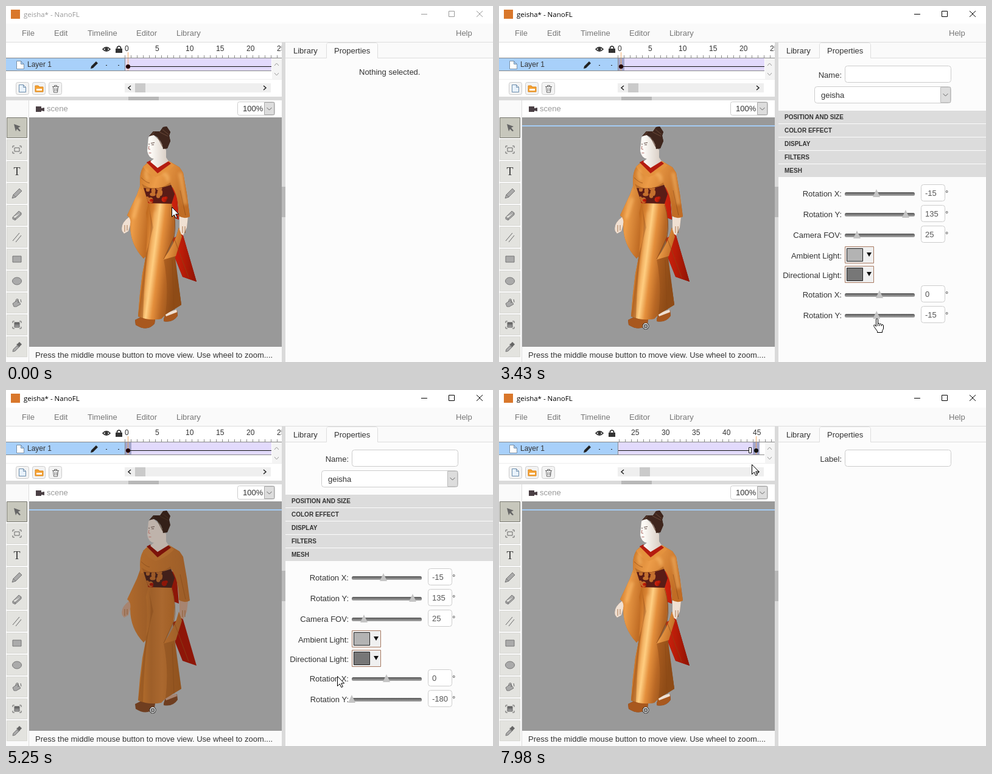
An HTML page that plays this animation: 800x585 px, repeating every 8 s.

```html
<!DOCTYPE html>
<html lang="en">
<head>
<meta charset="utf-8">
<title>Mesh lighting</title>
<style>
html, body { margin: 0; width: 100%; height: 100%; overflow: hidden; background: #fff; }
svg { display: block; width: 800px; height: 585px; font: 13px "Liberation Sans", Arial, sans-serif; fill: #333; }
.menu { fill: #777; }
.label { text-anchor: end; }
.box { fill: #fff; stroke: #ccc; }
.head { font-size: 10px; font-weight: bold; }
.small { font-size: 12px; }
.line { fill: none; stroke: #666; }
.icon { fill: #aaa; stroke: #777; }
</style>
</head>
<body>
<svg viewBox="0 0 800 585">
  <defs>
    <linearGradient id="track" x2="0" y2="1"><stop stop-color="#555"/><stop offset="1" stop-color="#aaa"/></linearGradient>
    <linearGradient id="skirtLit" gradientUnits="userSpaceOnUse" x1="222" y1="416" x2="283" y2="424">
      <stop stop-color="#c26c20"/><stop offset=".15" stop-color="#d98434"/><stop offset=".32" stop-color="#ffd084"/>
      <stop offset=".48" stop-color="#e48f3c"/><stop offset=".7" stop-color="#b96825"/><stop offset="1" stop-color="#8f4e18"/>
    </linearGradient>
    <linearGradient id="skirtDim"><stop stop-color="#b8702c"/><stop offset=".3" stop-color="#9e5f29"/><stop offset=".55" stop-color="#aa682f"/><stop offset="1" stop-color="#9c5a20"/></linearGradient>
    <linearGradient id="clothLit" x2="1" y2=".4"><stop stop-color="#c87426"/><stop offset=".4" stop-color="#ec9c48"/><stop offset="1" stop-color="#c06c24"/></linearGradient>
    <linearGradient id="clothDim"><stop stop-color="#b06a2c"/><stop offset="1" stop-color="#9c5d28"/></linearGradient>
    <linearGradient id="ribbonLit"><stop stop-color="#d42410"/><stop offset=".5" stop-color="#b81c08"/><stop offset="1" stop-color="#8e1404"/></linearGradient>
    <linearGradient id="faceLit"><stop offset=".2" stop-color="#fbf9f5"/><stop offset="1" stop-color="#d6cac0"/></linearGradient>
    <linearGradient id="falloff" gradientUnits="userSpaceOnUse" x1="190" x2="315"><stop stop-color="#fff"/><stop offset="1" stop-color="#000"/></linearGradient>
    <mask id="light" maskUnits="userSpaceOnUse" x="180" y="190" width="140" height="350"><path fill="url(#falloff)" d="M180 190h140v350H180z"/></mask>
    <filter id="soft" x="-50%" y="-50%" width="200%" height="200%"><feGaussianBlur stdDeviation="2.500"/></filter>
    <clipPath id="obi"><path d="M226 299q24 3 45-5l6 15-5 16-38-1z"/></clipPath>
    <clipPath id="rulerClip"><path d="M195 60h258v26H195z"/></clipPath>
    <clipPath id="trackClip"><path d="M196 60h240v47H196z"/></clipPath>
  </defs>

  <!-- title and menu -->
  <path fill="#fff" d="M0 0h800v585H0z"/>
  <rect x="8" y="6" width="15" height="15" fill="#d9772b"/>
  <g id="title">
    <text x="29" y="18" style="font:11.5px 'Open Sans','Noto Sans',sans-serif" fill="currentColor">geisha* - NanoFL</text>
    <path d="M682 13.500h10M727.500 8.500h9v9h-9zM773 8l10 10m0-10l-10 10" fill="none" stroke="currentColor"/>
  </g>
  <path fill="#fafafa" d="M0 29h800v31H0zM459 60h341v525H459zM0 155h38v430H0zM38 560h415v25H38z"/>
  <path stroke="#ddd" d="M0 59.500h800"/>
  <g class="menu">
    <text x="26" y="49">File</text><text x="79" y="49">Edit</text><text x="134" y="49">Timeline</text>
    <text x="214" y="49">Editor</text><text x="280" y="49">Library</text><text x="739" y="49">Help</text>
  </g>

  <!-- timeline -->
  <path fill="#a8d0fa" d="M0 86h195v20H0z"/>
  <path d="M159 71q6-6.500 12 0q-6 6.500-12 0z" fill="#fff" stroke="#222" stroke-width="1.500"/><circle cx="165" cy="71" r="2.700"/>
  <path d="M180 70h11v7h-11z"/><path d="M182.500 70v-2q3-4 6 0v2" fill="none" stroke="#222" stroke-width="1.600"/>
  <path d="M17.500 90.500h7l5 5v8h-12zm7 0v5h5" fill="#fff" stroke="#7890a8"/>
  <text class="small" x="35" y="100">Layer 1</text>
  <path d="M139 103l1-4 8-8 3 3-8 8zM164 97h2v1h-2zM184 97h2v1h-2z" fill="#222"/>
  <g clip-path="url(#rulerClip)"><g class="scrolled" id="ruler"></g></g>
  <g clip-path="url(#trackClip)"><g class="scrolled">
    <path fill="#e2dafc" d="M196 86h460v20H196z"/>
    <path id="cell" fill="#a3a6cc" d="M195 86h11v20h-11z"/>
    <path d="M200 99.500h440" stroke="#111"/>
    <path d="M638.500 94.500h4v9h-4z" fill="#fff" stroke="#111"/>
    <path id="playhead" d="M200.500 76v30" stroke="#f0a868"/>
    <circle cx="200.500" cy="99.500" r="3.600" fill="#200"/><circle cx="650.500" cy="99.500" r="3.600" fill="#111"/>
  </g></g>
  <path d="M0 85.500h453M0 106.500h436M195.500 86v20" stroke="#888"/>
  <path fill="#f4f4f4" d="M437 86h16v34h-16z"/>
  <path d="M441 98l3.500-4 3.500 4m-7 12l3.500 4 3.500-4" fill="none" stroke="#999"/>
  <path d="M0 120.500h453" stroke="#eee"/>
  <g id="layerButtons"></g>
  <path d="M21.500 129.500h7l4 4v8h-11zm7 0v4h4" fill="#e8f2fc" stroke="#6a8cac"/>
  <path d="M48 131h5l2 2h6v8H48z" fill="#f5a234" stroke="#d98418"/><path d="M50 136h9v3h-9z" fill="#fff"/>
  <path class="line" d="M76 132.500h11m-7.500 0v-2h4v2m-6 .5l1 9h6l1-9m-5 2v5m3-5v5"/>
  <path fill="#efefef" d="M195 127h240v15H195z"/>
  <rect id="thumb" y="127" width="17" height="15" fill="#cacaca"/>
  <path d="M205 131l-4 3.500 4 3.500m218-7l4 3.500-4 3.500" fill="none" stroke="#222" stroke-width="1.500"/>
  <path fill="#dadada" d="M0 149h453v6H0zM453 60h6v525h-6z"/>
  <path fill="#b8b8b8" d="M201 149h50v6h-50zM453 297h6v50h-6z"/>

  <!-- scene -->
  <path d="M49 165h9v3l5-1v6l-5-1v2h-9z" fill="#4b4045"/>
  <text x="67" y="173" style="fill:#999">scene</text>
  <rect class="box" x="380.500" y="157.500" width="61" height="22" rx="3"/>
  <text x="389" y="173">100%</text>
  <path d="M424.500 158.500h16v20h-16z" fill="#ddd" stroke="#aaa"/><path class="line" d="M428.500 167l4 4 4-4"/>
  <path fill="#999" d="M38 183h415v377H38z"/><path d="M37.500 155v430" stroke="#ddd"/>
  <path class="selected" d="M38 197h415" stroke="#a4cbf4" stroke-width="2"/>
  <g id="dim"></g><g id="lit" mask="url(#light)"></g>
  <g class="selected" fill="none"><circle cx="241" cy="526" r="4" fill="#999" stroke="#222" stroke-width="3"/><circle cx="241" cy="526" r="4" stroke="#fff" stroke-width="1.300"/></g>
  <text x="48" y="578">Press the middle mouse button to move view. Use wheel to zoom....</text>
  <g id="tools"></g>

  <!-- properties -->
  <path d="M459 85.500h67.500V64q0-3.500 3.500-3.500h77q3.500 0 3.500 3.500v21.500H800" fill="none" stroke="#ddd"/>
  <path d="M527 86V64q0-3 3-3h77q3 0 3 3v22h190v499H459V86z" fill="#fcfcfc"/>
  <text x="472" y="78">Library</text><text x="539" y="78">Properties</text>
  <text id="empty" x="580" y="113">Nothing selected.</text>
  <g class="selected"><rect class="box" x="568.500" y="98.500" width="174" height="27" rx="4"/><text id="fieldName" class="label" x="563" y="118"></text></g>
  <g id="mesh">
    <rect class="box" x="518.500" y="132.500" width="224" height="27" rx="4"/><text x="529" y="151">geisha</text>
    <path d="M725.500 133.500h16v25h-16z" fill="#ddd" stroke="#bbb"/><path class="line" d="M729.500 144l4 4 4-4"/>
  </g>
  <path id="arrow" d="M.5.5v16l3.700-3.500 2.600 5.600 2.500-1.100-2.600-5.500h5z" fill="#fff" stroke="#000"/>
  <path id="hand" d="M-1.500 1.500q2-2 3 .5v7q2-1.500 3 .5 2-1 3 1 2.500-.5 3 1.500v5q-1 2.500-2 4v2.500h-8v-2l-5-7q-2-4 1-3.500l2 2.500zM1.500 9v4m3-3v3m3-2v2" fill="#fff" stroke="#000"/>
</svg>
<script>
const LOOP = 8000, STEP = 70;
const $ = id => document.getElementById(id);
const all = (selector, run) => document.querySelectorAll(selector).forEach(run);
const add = (id, markup) => $(id).insertAdjacentHTML('beforeend', markup);
const show = (el, on) => el.style.display = on ? '' : 'none';
const move = (el, x, y = 0) => el.setAttribute('transform', `translate(${x} ${y})`);
const each = (n, make) => Array.from({ length: n }, (_, i) => make(i)).join('');
const noise = n => { const v = Math.sin(n * 127.1) * 43758.5; return v - Math.floor(v); };

add('ruler', each(50, i => `<path d="M${195.5 + i * 10} 81v4" stroke="#888"/>` +
  (i % 5 ? '' : `<text class="small" x="${195 + i * 10}" y="74">${i}</text>`)));
add('layerButtons', each(3, i => `<rect x="${16.5 + i * 27}" y="125.500" width="21" height="20" rx="3" fill="#f3f3f3" stroke="#ccc"/>`));

// The same figure is drawn once in shade and once in full light.
const figure = c => `
  <path fill="${c.ribbon}" d="M268 296l12 5 4 50-13-5zm6 86l16-8 23 79-23-8-12-30z"/>
  <path fill="${c.shoe}" d="M259 515l3-10 19-5 1 9q-8 12-23 9zM212 516l10-5 23 4-1 7q-12 14-31 2z"/>
  <path fill="${c.skin}" d="M261 505l19-6 1 4-18 7zM203 346q-16 12-12 24l3 4 7-4 5-18zM285 346h14l-2 18-6 13-6-4z"/>
  <path fill="${c.cloth}" d="M223 288l-8 22-16 34q7 5 5 16 0 32 22 55l7-8 3-81-8-28z"/>
  <path fill="${c.skirt}" d="M234 324h38q8 25 3 56l-15 36 17-5 4 30 7 50-26 16-7 7q-20 4-38-4 2-35 7-70l5-25q5-45 1-75z"/>
  <path fill="${c.fold}" opacity=".45" d="M276 378l-17 38q9 45 3 91l26-16-10-78zM234 326q9 45-4 80l-13 104 8 4q3-110 17-150z"/>
  <path fill="${c.cloth}" d="M284 364q-6 26-26 53l21-6 10-32z"/>
  <path fill="${c.cloth}" d="M236 256q-20 8-15 45h28l22-7q13 18 13 51 9 6 18 1-4-36-11-72l-6-9-17-10z"/>
  <g clip-path="url(#obi)">
    <path fill="${c.obi}" d="M220 290h60v40h-60z"/>
    ${each(14, i => `<ellipse cx="${228 + 36 * noise(i + 1) ** 1.4}" cy="${300 + 24 * noise(i + 30)}" rx="${2 + noise(i) * 3}" ry="${2 + noise(i + 60) * 4}" fill="${i % 3 ? c.pattern : c.ribbon}"/>`)}
  </g>
  <path fill="${c.fold}" d="M223 292q22 16 47-2l1 4q-22 9-45 5z" opacity=".4"/>
  <path fill="${c.lapel}" d="M225 264q8 13 21 17 18-6 30-19l-8-7-20 13-12-12z"/>
  <path fill="${c.collar}" d="M231 257l6-3 12 12 16-12 6 5-22 16z"/>
  <path fill="${c.face}" d="M234 216l6-6 13 12 10 15v12l4 6-18 11-12-10 6-5q-9-1-11-13z"/>
  <path fill="${c.hair}" d="M235 214l7-8h11l5-7 6-1 6 9-2 6 2 9-5 12-7 1q-2-17-15-23z"/>
  <path fill="none" stroke="${c.hairShine}" d="M244 207l-5 5m13-5l14 7m-17 1l8 16m0-28l10 8"/>
  <path fill="none" stroke="#5a453e" d="M238 225.500l6-1m-5 3.500h4M234 227h2"/>
  <path fill="none" stroke="#b0706a" d="M235 230l-1 5 3 .5m-2.500 6h4"/>
  <path fill="none" stroke="${c.fold}" opacity=".7" d="M272 327q9 28 4 52l-17 37m14 1l3 82M286 303l9 41M222 282q8 8 14 9M276 381l24 65M195 360v11m4-11v9M290 362v11m4-11v11"/>
  <path fill="none" stroke="${c.glow}" stroke-width="5" filter="url(#soft)" d="M231 269q-3 8 2 17M258 276q10 2 7 12M286 274l9 52M219 316l-10 33M246 338q-6 60-14 140" opacity=".6"/>`;

add('dim', figure({
  ribbon: '#8e1608', shoe: '#6f3e20', skin: '#a78470', cloth: 'url(#clothDim)', skirt: 'url(#skirtDim)', fold: '#844a1c', obi: '#42201a',
  pattern: '#9c5a28', lapel: '#ae6a2e', collar: '#7c130b', face: '#bfb3ab', hair: '#342018', hairShine: '#46301f', glow: 'none'
}));
add('lit', figure({
  ribbon: 'url(#ribbonLit)', shoe: '#a8581e', skin: '#f0e0d2', cloth: 'url(#clothLit)', skirt: 'url(#skirtLit)', fold: '#8c4816', obi: '#5a1c16',
  pattern: '#c4702e', lapel: '#e4923e', collar: '#b41c10', face: 'url(#faceLit)', hair: '#3f261d', hairShine: '#6b4a38', glow: '#ffc474'
}));

const corners = '<path class="line" d="M-7-3v-3h3m8 0h3v3M7 3v3H4m-8 0h-3V3"/>';
const icons = [
  '<path d="M-5-6L6-2 2 0l4 5-2 1-4-4-2 4z" fill="#666"/>',
  corners + '<path class="line" d="M-4-3h8v6h-8z"/>',
  '<text text-anchor="middle" y="6" style="font:18px Liberation Serif,serif">T</text>',
  '<path class="icon" d="M-8 8l2-6L4-8l4 4L-2 6zm2-6l4 4"/>',
  '<path class="icon" d="M-7 3L3-7l4 3v3L-3 8l-4-2zl4 2L7-4M-3 5v3"/>',
  '<path class="line" d="M-7 6L4-7M-2 8L7-3"/>',
  '<path class="icon" d="M-7-5H7V5H-7z"/>',
  '<ellipse class="icon" rx="7.500" ry="6"/>',
  '<path class="icon" d="M-7 1l8-6 5 7-7 4h-4z"/><path class="line" d="M-2-2q0-6 4-4v6m4-6l1 5"/>',
  corners + '<path d="M-4-4h8v8h-8z" fill="url(#track)" stroke="#666"/>',
  '<path class="icon" d="M-7 8l1-4 6-6 3 3-6 6z"/><path d="M-1-4l2-1 3-3 4 4-3 3-1 2z" fill="#666"/>'
];
add('tools', icons.map((icon, i) => {
  const skin = i ? 'fill="#e3e3df" stroke="#d8d8d4"' : 'fill="#c7c7bc" stroke="#77776f"';
  return `<g transform="translate(18 ${200 + i * 36})"><path d="M-16.500-16.500h33v33h-33z" ${skin}/>${icon}</g>`;
}).join(''));

const slider = (label, y, x, value, id) => `
  <text class="label" x="563" y="${y + 5}">${label}:</text>
  <rect x="568" y="${y - 2}" width="115" height="6" rx="2.500" fill="url(#track)"/>
  <path id="${id}Knob" transform="translate(${x})" d="M0 ${y - 7}l6 13h-12z" fill="#c4c4c4"/>
  <rect class="box" x="693.500" y="${y - 14.5}" width="39" height="27" rx="4"/>
  <text id="${id}Value" x="700" y="${y + 4}" style="fill:#555">${value}</text><text x="733" y="${y + 4}">°</text>`;
const swatch = (label, y, color) => `
  <text class="label" x="563" y="${y + 20}">${label}:</text>
  <path d="M568.500 ${y + .5}h47v27h-47z" fill="#f0f0f0" stroke="#a87a62"/>
  <path d="M571.500 ${y + 3.5}h26v21h-26z" fill="${color}" stroke="#222"/>
  <path d="M604 ${y + 10}h8l-4 7z" fill="#111"/>`;
add('mesh', ['POSITION AND SIZE', 'COLOR EFFECT', 'DISPLAY', 'FILTERS', 'MESH'].map((name, i) =>
  `<path d="M459 ${172 + i * 22}h341v21H459z" fill="#dcdcdc"/><text class="head" x="469" y="${186 + i * 22}">${name}</text>`).join('') +
  slider('Rotation X', 308, 620, -15, 'tilt') + slider('Rotation Y', 342, 668, 135, 'turn') +
  slider('Camera FOV', 376, 588, 25, 'fov') +
  swatch('Ambient Light', 395, '#b3b3b3') + swatch('Directional Light', 427, '#777') +
  slider('Rotation X', 474, 625, 0, 'lightX') + slider('Rotation Y', 508, 625, 0, 'lightY'));

const ramp = (t, from, to) => Math.min(1, Math.max(0, (t - from) / (to - from)));

// Pointer trips: it rests between them.
const trips = [
  { from: 490, to: 560, x: 265, y: 330 },
  { from: 1540, to: 2450, x: 603, y: 496 },
  { from: 2450, to: 2800, x: 628, y: 513 },
  { from: 3290, to: 4550, x: 565, y: 514 },
  { from: 5180, to: 5810, x: 372, y: 118 },
  { from: 5810, to: 5950, x: 356, y: 134 },
  { from: 6440, to: 6790, x: 434, y: 92 },
  { from: 6930, to: 7210, x: 423, y: 96 },
  { from: 7910, to: 7980, x: 415, y: 122 }
];
const pointerAt = t => trips.reduce(([x, y], trip) => {
  const k = ramp(t, trip.from, trip.to);
  return [x + (trip.x - x) * k, y + (trip.y - y) * k];
}, [272, 330]);

// The light is dragged in two pulls and snaps to 15 degrees.
const lightAt = t => -15 * Math.round(7 * ramp(t, 3290, 4030) + 5 * ramp(t, 4340, 4620));

function draw(now) {
  const t = Math.floor(now % LOOP / STEP) * STEP;
  const selected = t >= 1190, scrolled = t >= 6160, last = t >= 7770;
  const dragging = t >= 2730 && t < 5250;

  $('title').style.color = t < 980 ? '#999' : '#000';
  show($('empty'), !selected);
  show($('cell'), selected);
  show($('mesh'), selected && !last);
  all('.selected', el => show(el, selected));
  $('fieldName').textContent = last ? 'Label:' : 'Name:';

  all('.scrolled', el => move(el, scrolled ? -228 : 0));
  for (const id of ['cell', 'playhead']) move($(id), last ? 450 : 0);
  $('thumb').setAttribute('x', scrolled ? 231 : 212);

  const angle = last ? 0 : lightAt(t);
  $('lightYValue').textContent = angle || 0;
  move($('lightYKnob'), 625 + angle * 57 / 180);
  $('falloff').setAttribute('gradientTransform', `translate(${125 * Math.cos(angle * Math.PI / 180)})`);

  show($('arrow'), !dragging);
  show($('hand'), dragging);
  move($(dragging ? 'hand' : 'arrow'), ...pointerAt(t).map(Math.round));
}

const start = performance.now();
function tick() {
  draw(performance.now() - start);
  requestAnimationFrame(tick);
}
tick();
</script>
</body>
</html>
```
